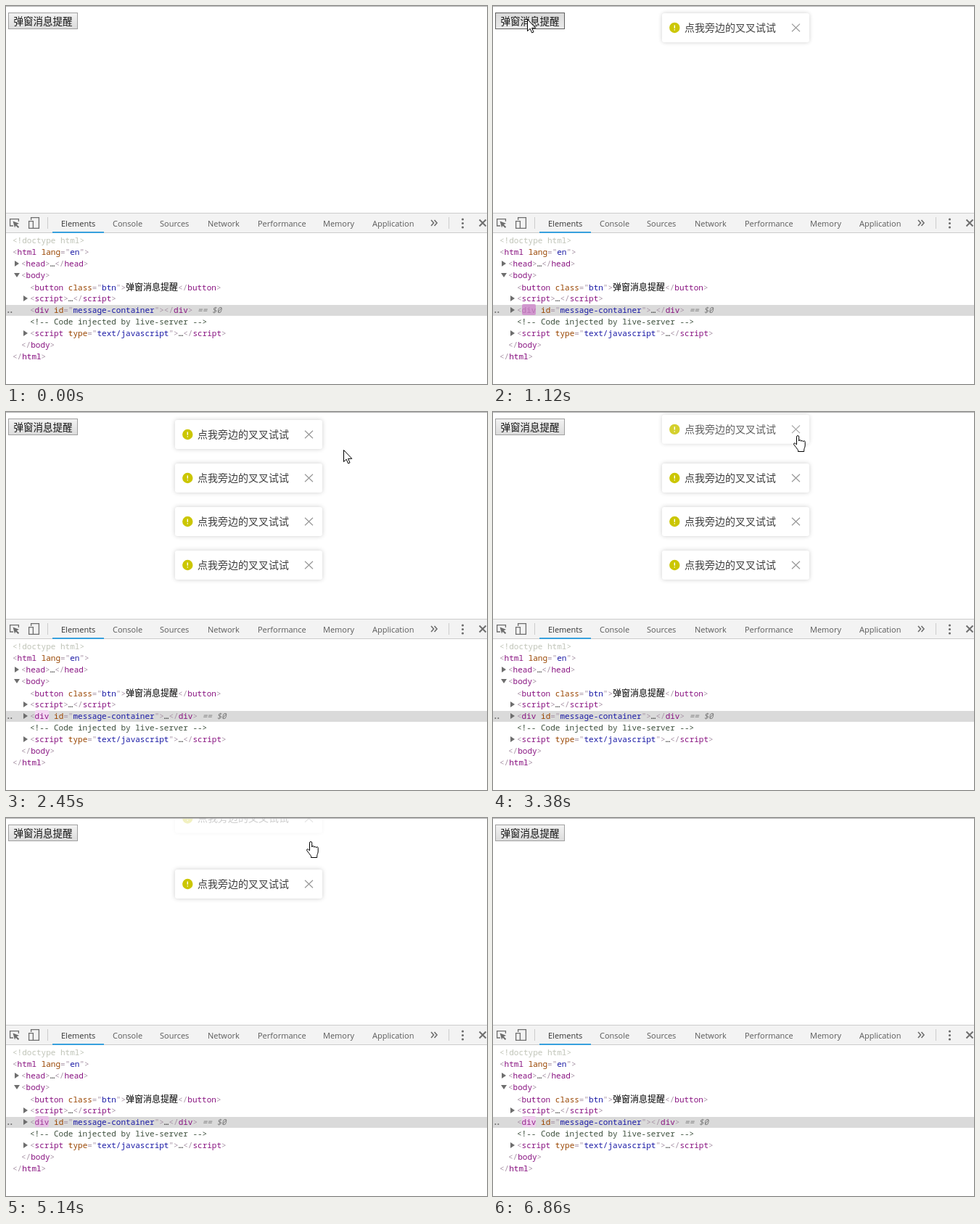
These frames come from a looping animation (663x521 px, 7.16 s). An HTML page:

```html
<!DOCTYPE html>
<html lang="zh">
<head>
<meta charset="utf-8">
<style>
html, body { margin: 0; width: 663px; height: 521px; overflow: hidden; background: #fff; }
body { position: relative; }
body div, svg { position: absolute; }
#page { left: 0; top: 1px; width: 663px; height: 284px; overflow: hidden; font-family: "Noto Sans CJK SC", "Noto Sans CJK", sans-serif; font-weight: 350; }
#topline { left: 0; top: 0; width: 663px; height: 1px; background: #b2b2b2; }
#btn { left: 3px; top: 8px; width: 94px; height: 21px; border: 1px solid #a0a0a0; text-align: center; font-size: 13.5px; line-height: 21px; white-space: nowrap; color: #111; background: linear-gradient(#f2f2f2, #dcdcdc); }
#btn.hover { border-color: #808080; }
#btn.down { border-color: #606060; background: linear-gradient(#dadada, #eaeaea); }
.card { left: 233px; top: 0; width: 203px; height: 40px; border-radius: 3px; background: #fff; box-shadow: 0 0 6px rgba(0,0,0,.2); font-size: 14px; line-height: 39px; color: #3c3c3c; }
.card span { position: absolute; left: 31px; top: 0; white-space: nowrap; }
.card svg { left: 0; top: 0; }
#overlay { background: rgba(111,168,220,.66); }
#tip { left: 0; height: 24px; background: #333740; border-radius: 0 2px 2px 0; color: #fff; font: 11px/24px "Open Sans", sans-serif; white-space: nowrap; padding: 0 8px 0 4px; }
#tip b { font-family: "Noto Sans Mono", monospace; color: #e78ae7; padding-right: 7px; }
#tip span { border-left: 1px solid #777; padding-left: 7px; }
#tip::before { content: ""; position: absolute; left: 5px; top: -8px; border: 8px solid transparent; border-top: 0; border-bottom-color: #333740; }
#bar { left: 0; top: 285px; width: 663px; height: 26px; background: #f3f3f3; border: solid #ccc; border-width: 1px 0; }
#bar div { top: 0; font: 11px/27px "Open Sans", sans-serif; color: #5a5a5a; white-space: nowrap; }
#bar div:first-of-type { color: #333; }
#bar svg { left: 0; top: -1px; }
.row { left: 0; width: 663px; height: 15px; white-space: pre; color: #222; font: 11px/15px "Noto Sans Mono", monospace; }
.row .text { position: absolute; top: -1px; }
.row.hover { background: #ebf1fb; }
#row6 { background: #dadada; }
.row u { text-decoration: none; color: #a894a6; }
.tag { color: #881280; border-radius: 2px; }
.attr { color: #994500; }
.val { color: #1a1aa6; }
.cjk { font: 12px/15px "Noto Sans CJK SC", "Noto Sans CJK", sans-serif; color: #000; }
.doctype { color: #c0c4b8; }
.comment { color: #3d4f3d; }
.row em { color: #777; }
.arrow { position: absolute; top: 3px; border: 4px solid transparent; border-left: 6px solid #6e6e6e; border-right: 0; }
.arrow.open { top: 4px; border: 4px solid transparent; border-top: 6px solid #6e6e6e; border-bottom: 0; margin-left: -1px; }
#pointer { left: 0; top: 0; overflow: visible; }
</style>
</head>
<body>
<div id="page">
  <div id="btn">弹窗消息提醒</div>
  <div id="cards"></div>
  <div id="overlay"></div>
  <div id="tip"><b></b><span></span></div>
</div>
<div id="topline"></div>
<div id="bar">
  <svg width="663" height="28" fill="none" stroke="#6e6e6e" stroke-width="1.3">
    <path d="M10 18H5.6V8.6H17.4V12"/>
    <path d="M9.5 11.5 18 14.8 14.8 16.2 18.2 19.6 16.7 21 13.4 17.7 12 20.5Z" fill="#6e6e6e" stroke="none"/>
    <path d="M34.6 10V6.6H45.4V21.4H38M31.6 11.6H37.4V21.4H31.6Z"/>
    <path d="M57.5 6V22M610.5 6V22" stroke="#ccc" stroke-width="1"/>
    <path d="M586 10 589.5 14 586 18M590.5 10 594 14 590.5 18" stroke-width="1.6"/>
    <path d="M652.5 9.5 661.5 18.5M661.5 9.5 652.5 18.5" stroke-width="2"/>
    <path d="M629.5 9V9.01M629.5 14.5V14.51M629.5 20V20.01" stroke-width="3.2" stroke-linecap="round"/>
    <path d="M64 27H135" stroke="#38a1dd" stroke-width="2"/>
  </svg>
</div>
<div id="code"></div>
<svg id="pointer" width="20" height="26" fill="#fff" stroke="#000" stroke-linejoin="round">
  <path id="arrow" d="M.5.5V16.6L4.2 13.2 6.6 18.9 9 17.9 6.6 12.3H11.8Z"/>
  <path id="hand" d="M-1.5 13V2.2a1.6 1.6 0 0 1 3.2 0V8a1.5 1.5 0 0 1 3 .3 1.5 1.5 0 0 1 2.8.6 1.4 1.4 0 0 1 2.7.8V14c0 3-1.5 4-1.5 6.5v2H.5v-2C-1 18-3.5 15.5-5.3 12.8c-.8-1.5 1-2.6 2.2-1.4z"/>
</svg>
<script>
const LOOP = 7160, ENTER = 300, LEAVE = 300, COLLAPSE = 120, FLASH = 1400;
const opened = [850, 1150, 1400, 1680];
const closed = [3300, 4235, 4936, 5840];
const removed = closed.map(c => c + LEAVE + COLLAPSE);
const mutations = [...opened, ...removed];

// pointer stops: time, x, y
const stops = [
  [90, 190, 484], [500, 47, 18], [1720, 47, 18], [2270, 490, 72], [2300, 490, 72],
  [2450, 465, 52], [2900, 420, 32], [6060, 420, 32], [6500, 597, 342], [6538, 597, 342],
  [6540, 600, 463], [6570, 600, 463]
];
// inspected boxes: x, y, width, height
const boxes = { 'html': [-5, 0, 678, 39], 'body': [3, 8, 662, 23], 'button.btn': [3, 8, 96, 23] };
const rowTargets = { 1: 'html', 3: 'body', 4: 'button.btn', 9: 'body', 10: 'html' };

const $ = id => document.getElementById(id);
const clamp = v => Math.min(1, Math.max(0, v));
const ease = v => (v = clamp(v), v * v * (3 - 2 * v));
const mix = (a, b, p) => a + (b - a) * p;
const show = (el, on) => el.style.display = on ? '' : 'none';

const markup = source => source
  .replace(/<(\/?)(\w+)((?: \w+="[^"]*")*)>/g, (_, slash, name, attrs) =>
    `<u>&lt;${slash}</u><span class="tag">${name}</span>` +
    attrs.replace(/ (\w+)="([^"]*)"/g, ' <span class="attr">$1</span><u>="</u><span class="val">$2</span><u>"</u>') +
    '<u>&gt;</u>')
  .replace(/[一-龥]+/g, '<span class="cjk">$&</span>');

// indent, fold arrow, content
const rows = [
  [9, '', '<span class="doctype">&lt;!doctype html&gt;</span>'],
  [9, '', markup('<html lang="en">')],
  [21, 'arrow', markup('<head>…</head>')],
  [21, 'arrow open', markup('<body>')],
  [33, '', markup('<button class="btn">弹窗消息提醒</button>')],
  [33, 'arrow', markup('<script>…<\/script>')],
  [33, 'arrow', '<u>&lt;</u><span class="tag" id="flash">div</span> <span class="attr">id</span><u>="</u>' +
    '<span class="val">message-container</span><u>"&gt;</u><span id="dots">…</span>' +
    markup('</div>') + '<em> == $0</em>'],
  [33, '', '<span class="comment">&lt;!-- Code injected by live-server --&gt;</span>'],
  [33, 'arrow', markup('<script type="text/javascript">…<\/script>')],
  [21, '', markup('</body>')],
  [9, '', markup('</html>')]
];
$('code').innerHTML = rows.map(([x, fold, html], i) =>
  `<div class="row" id="row${i}" style="top:${316 + 16 * i}px">` +
  (fold && `<span class="${fold}" style="left:${x - 9}px"></span>`) +
  `<span class="text" style="left:${x}px">${html}</span></div>`).join('');
$('row6').insertAdjacentHTML('beforeend', '<span class="text" style="left:0;font-weight:bold;letter-spacing:-2.5px;color:#666">..</span>');
const fold = document.querySelector('#row6 .arrow');
const rowEls = [...document.querySelectorAll('.row')];

[['Elements', 76], ['Console', 147], ['Sources', 212], ['Network', 278], ['Performance', 347], ['Memory', 437], ['Application', 505]]
  .forEach(([name, x]) => $('bar').insertAdjacentHTML('beforeend', `<div style="left:${x}px">${name}</div>`));

$('cards').innerHTML = `<div class="card"><svg width="203" height="40">
  <circle cx="17.3" cy="20" r="7.2" fill="#cbc600"/>
  <path d="M17.3 16.5V20.7M17.3 22.3V23.6" stroke="#fff" stroke-width="1.4"/>
  <path d="M179 14.7 190 25.3M190 14.7 179 25.3" stroke="#999" stroke-width="1.2"/>
  </svg><span>点我旁边的叉叉试试</span></div>`.repeat(opened.length);
const cards = [...$('cards').children];

function drawCards(t) {
  let y = 10;
  cards.forEach((card, i) => {
    const enter = ease((t - opened[i]) / ENTER);
    const leave = ease((t - closed[i]) / LEAVE);
    show(card, t >= opened[i] && t < closed[i] + LEAVE);
    card.style.opacity = enter * (1 - leave);
    card.style.transform = `translateY(${y - 40 * (1 - enter + leave)}px)`;
    y += 60 * (1 - ease((t - closed[i] - LEAVE) / COLLAPSE));
  });
}

function drawFlash(t) {
  const age = (t - Math.max(...mutations.filter(m => m <= t), -FLASH)) / FLASH;
  const p = 1 - (1 - clamp(age / .8)) ** 3.2;
  const blend = (a, b) => a.map((v, i) => Math.round(mix(v, b[i], p)));
  $('flash').style.background = `rgba(${blend([158, 54, 153], [245, 219, 244])},${clamp((1 - age) / .2)})`;
  $('flash').style.color = `rgb(${blend([255, 255, 255], [136, 18, 128])})`;
  const filled = t >= opened[0] && t < removed[3];
  show($('dots'), filled);
  show(fold, filled);
}

function pointerAt(t) {
  const i = stops.findIndex(s => s[0] > t);
  if (i < 1) return null;
  const [a, b] = [stops[i - 1], stops[i]];
  const p = ease((t - a[0]) / (b[0] - a[0]));
  return [mix(a[1], b[1], p), mix(a[2], b[2], p)];
}

function drawPointer(t) {
  const pos = pointerAt(t), [x, y] = pos || [-99, -99];
  const hand = t > 2820 && t < 6090;
  show($('pointer'), pos);
  show($('hand'), hand);
  show($('arrow'), !hand);
  $('pointer').style.transform = `translate(${Math.round(x)}px,${Math.round(y)}px)`;

  const overButton = x >= 3 && x < 99 && y >= 9 && y < 32;
  const pressed = opened.some(o => t > o - 80 && t < o);
  $('btn').className = pressed ? 'down' : overButton ? 'hover' : '';

  const row = Math.floor((y - 316) / 16);
  rowEls.forEach((el, i) => el.classList.toggle('hover', i === row));
  inspect(rowTargets[row]);
}

function inspect(name) {
  show($('overlay'), name);
  show($('tip'), name);
  if (!name) return;
  const [x, y, w, h] = boxes[name];
  $('overlay').style.cssText = `left:${x}px;top:${y}px;width:${w}px;height:${h}px;` +
    (name === 'body' ? 'box-shadow:0 0 0 8px rgba(246,178,107,.66)' : '');
  $('tip').style.top = y + h + 9 + 'px';
  $('tip').firstChild.textContent = name;
  $('tip').lastChild.textContent = `${w} × ${h}`;
}

function draw(now) {
  const t = now % LOOP;
  drawCards(t);
  drawFlash(t);
  drawPointer(t);
  requestAnimationFrame(draw);
}
draw(0);
</script>
</body>
</html>
```
